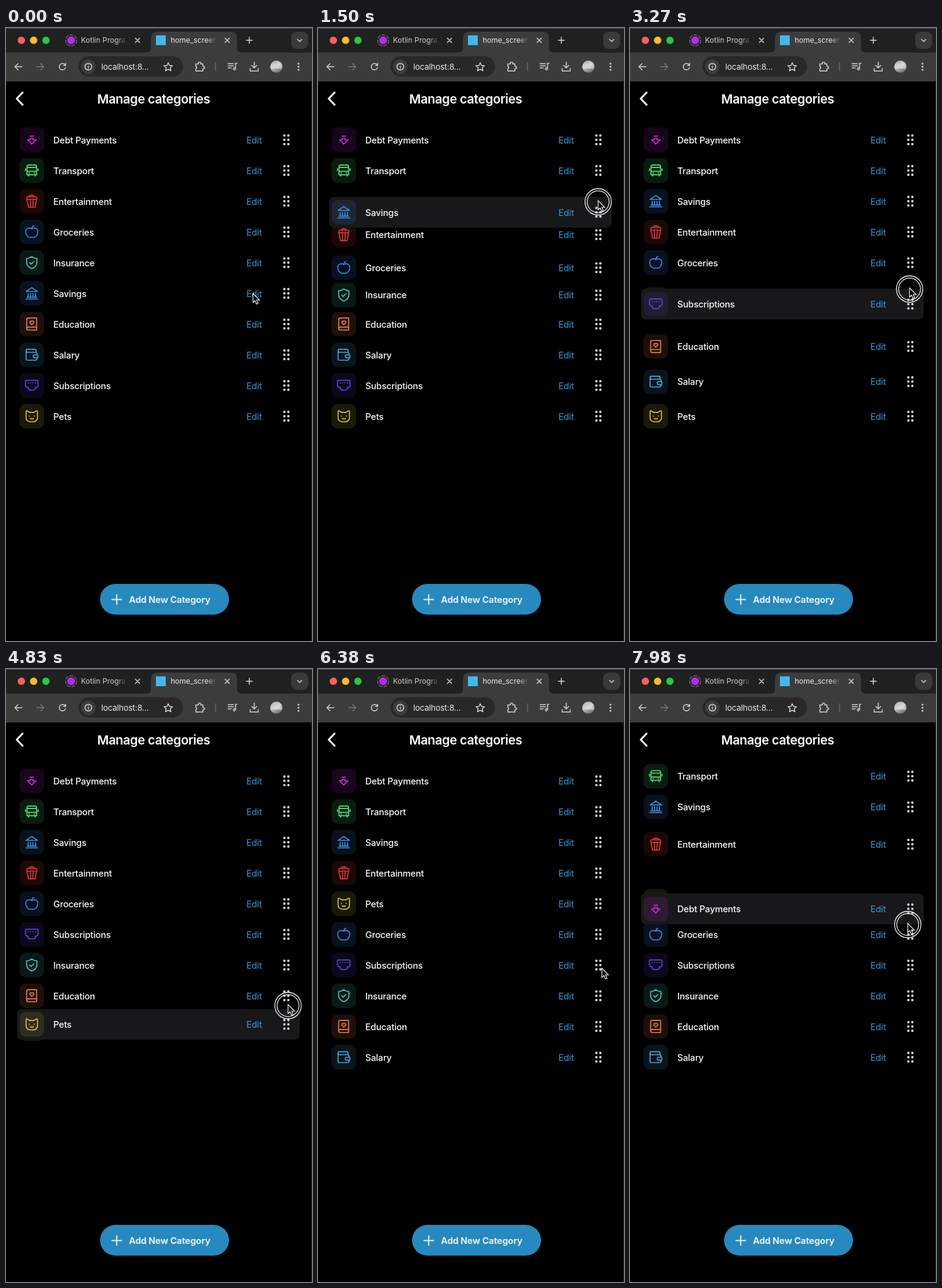
An HTML page that plays this animation: 498x998 px, repeating every 8 s.

```html
<!DOCTYPE html>
<html lang="en">
<head>
<meta charset="utf-8">
<title>Manage categories</title>
<style>
  html, body { margin: 0; width: 100%; height: 100%; overflow: hidden; background: #000; }
  svg { display: block; width: 498px; height: 998px; font-family: Inter, "Open Sans", sans-serif; }
  .line { fill: none; stroke-linecap: round; stroke-linejoin: round; }
  .label, .edit { font-size: 14.6px; letter-spacing: -.2px; }
  .label { font-weight: 500; fill: #fafafa; }
  .edit { fill: #369ad6; }
</style>
</head>
<body>
<svg viewBox="0 0 498 998">
  <defs>
    <linearGradient id="fadeBar"><stop stop-color="#1f2020" stop-opacity="0"/><stop offset=".7" stop-color="#1f2020"/></linearGradient>
    <linearGradient id="fadeTab"><stop stop-color="#3c3c3c" stop-opacity="0"/><stop offset=".7" stop-color="#3c3c3c"/></linearGradient>
    <linearGradient id="avatar" x2=".4" y2="1"><stop stop-color="#a5a5a5"/><stop offset=".5" stop-color="#d4d4d4"/><stop offset="1" stop-color="#777"/></linearGradient>
  </defs>
  <rect width="498" height="998"/>

  <!-- Browser window -->
  <rect width="498" height="41" fill="#1f2020"/>
  <rect width="498" height="1" fill="#4a4a4a"/>
  <circle cx="25" cy="20" r="6" fill="#ff5f57"/>
  <circle cx="45" cy="20" r="6" fill="#febc2e"/>
  <circle cx="65" cy="20" r="6" fill="#28c840"/>
  <path d="M228 40q8 0 8-8V16q0-10 10-10h120q10 0 10 10v16q0 8 8 8h114v47H0V40z" fill="#3c3c3c"/>
  <circle cx="106" cy="20" r="9" class="line" stroke="#66666a" stroke-width="1.5" stroke-dasharray="5 3"/>
  <circle cx="106" cy="20" r="6.5" fill="#b12de6"/>
  <rect x="244" y="12" width="16" height="16" fill="#42b8ee"/>
  <g font-size="12">
    <text x="122" y="24.3" fill="#d2d2d2">Kotlin Progra</text>
    <text x="268" y="24.3" fill="#eee">home_screen</text>
  </g>
  <rect x="180" y="8" width="24" height="26" fill="url(#fadeBar)"/>
  <rect x="326" y="8" width="24" height="26" fill="url(#fadeTab)"/>
  <rect x="464" y="6" width="28" height="28" rx="9" fill="#3a3a3b"/>
  <rect x="118" y="46" width="170" height="33" rx="16.5" fill="#282828"/>
  <circle cx="134" cy="63" r="12" fill="#3c3c3c"/>
  <text x="155" y="67.6" font-size="13.3" letter-spacing="-.2" fill="#e6e6e6">localhost:8...</text>
  <g class="line" stroke="#d2d2d2" stroke-width="1.5">
    <path d="M210.500 16.500l7 7m0-7l-7 7M356.500 16.500l7 7m0-7l-7 7M391 20h10m-5-5v10M474.500 18.500l3.500 3.500 3.500-3.500"/>
    <path d="M26 63H14.500m5-5l-5 5 5 5"/>
    <path d="M50 63h11.500m-5-5l5 5-5 5" stroke="#777"/>
    <path d="M96.500 60.500a5.200 5.200 0 1 0 .4 4M97 57.500v3.500h-3.500"/>
    <circle cx="134" cy="63" r="5.5"/><path d="M134 62.500v3M134 60v.1"/>
    <path d="M264 56.500l2 4.500 5 .5-3.800 3.300 1.200 4.900-4.400-2.600-4.400 2.600 1.200-4.900-3.800-3.300 5-.5z"/>
    <path d="M309 58.500h4v-1a2 2 0 0 1 4 0v1h3.500v4h.5a2 2 0 0 1 0 4h-.5v3.500H309v-3.700a2 2 0 0 0 0-3.800z"/>
    <path d="M341 56.500v13" stroke="#666"/>
    <path d="M361.500 58h8.500m-8.500 3.500h8.500m-8.500 3.500h5m7 1.500V57.500h2.500"/><circle cx="371.700" cy="66.500" r="1.7"/>
    <path d="M404 55.500v9.500m-4-4l4 4 4-4M397.500 66v4h13v-4"/>
  </g>
  <circle cx="440" cy="63" r="10" fill="url(#avatar)"/>
  <path d="M431 66l15-8 3 8z" fill="#e2e2e2" opacity=".6"/>
  <g fill="#d2d2d2"><circle cx="476" cy="58" r="1.500"/><circle cx="476" cy="63" r="1.500"/><circle cx="476" cy="68" r="1.500"/></g>

  <!-- App -->
  <path d="M27 105l-9.500 10 9.500 10" class="line" stroke="#fff" stroke-width="3"/>
  <text x="240.300" y="122.700" text-anchor="middle" font-size="20.5" font-weight="600" letter-spacing="-.4" fill="#fff">Manage categories</text>
  <g id="list"></g>
  <rect x="153" y="905" width="210" height="50" rx="25" fill="#2789bd"/>
  <path d="M172.500 930.500h15.500m-7.750-7.750v15.500" class="line" stroke="#e4eff5" stroke-width="2"/>
  <text x="200" y="935.700" font-size="14.700" font-weight="650" letter-spacing="-.15" fill="#e4eff5">Add New Category</text>
  <rect x="497" y="87" width="1" height="911" fill="#2a2a2a"/>

  <g id="pointer">
    <g id="ring" class="line" stroke="#f2f2f2">
      <circle cy="1" r="21.500" stroke-width="1.300"/>
      <circle cy="1" r="17.800" stroke-width="1.200"/>
    </g>
    <path d="M0-1v15l3.300-3 2.400 5.500 2.600-1.100-2.400-5.400h4.700z" stroke="#fff" stroke-width="1.100"/>
  </g>
</svg>
<script>
const LOOP = 8000, ROW = 50, TOP = 182;

// Name, colour, icon in a 24 px box
const categories = [
  ['Debt Payments', '#c92fdc', 'M9 6h6M9.500 9.500h5V12H19l-7 7-7-7h4.500z'],
  ['Transport', '#52e57e', 'M4 19V6q0-3 3-3h10q3 0 3 3v13zM4 7h16M4 13.500h16M1.500 9v3M22.500 9v3M6.500 19v2.500M17.500 19v2.500M7 16.300h1M16 16.300h1'],
  ['Entertainment', '#e23a3a', 'M4 9l2.500 13h11L20 9zM9.500 9l.8 13M14.500 9l-.8 13M4 9q-1.500-4.500 3-4.500Q8 2 12 2t5 2.500q4.500 0 3 4.500M9 5.500q3-2 6 0'],
  ['Groceries', '#3d86ec', 'M12 7C9 4.500 2 5 2 12c0 5 4 9.500 7 9.500 1.500 0 2-.5 3-.5s1.500.5 3 .5c3 0 7-4.500 7-9.500 0-7-7-7.500-10-5zM12 7q0-4 3.500-5'],
  ['Insurance', '#48cdb4', 'M12 2q4 3 8.500 3v7q0 6.500-8.500 10-8.500-3.500-8.500-10V5Q8 5 12 2zM8.500 12l2.500 2.500 4.500-4.500'],
  ['Savings', '#428de4', 'M2.500 9L12 2.500 21.500 9zM2 21.500h20M4 18.500h16M6 12v6M10 12v6M14 12v6M18 12v6'],
  ['Education', '#ea7c4c', 'M20 17H6q-2.500 0-2.500 2.500T6 22h14V2H6Q3.500 2 3.500 4.500v15M12 13L8.800 9.800C7.500 8 10.500 5.500 12 8c1.500-2.500 4.500 0 3.200 1.800z'],
  ['Salary', '#48a4dc', 'M19 8V4.500Q19 3 17.500 3H4.500Q2.500 3 2.500 5v14q0 2 2 2h14q2 0 2-2v-2M2.500 5.500Q3 8 5 8h13.500q2 0 2 2v2M22 12h-5a2.500 2.500 0 0 0 0 5h5z'],
  ['Subscriptions', '#5c43dc', 'M3 3.500h18q1.500 0 1.500 1.500v7q0 3-3 3H18v1.500q0 3-3 3H9q-3 0-3-3V15H4.500q-3 0-3-3V5q0-1.500 1.500-1.500zM6 7.500v.8M10 7.500v.8M14 7.500v.8M18 7.500v.8'],
  ['Pets', '#d4c44c', 'M2.500 5q0-3 2.500-1.500L9 6q3-.8 6 0l4-2.500q2.500-1.500 2.500 1.500v9q0 7.500-9.500 7.500T2.500 14zM8 11.500v.5M16 11.500v.5M9.500 16q1.500 1.500 2.500 0 1 1.500 2.500 0']
];

// path: [time, y] of the held row; swaps: when each neighbour makes room
const drags = [
  { from: 5, to: 2, press: 700, release: 1640, path: [[1060, 432], [1500, 300], [1700, 282]], swaps: [1240, 1319, 1362] },
  { from: 8, to: 5, press: 2700, release: 3400, path: [[2860, 582], [3270, 449.5], [3450, 432]], swaps: [3168, 3184, 3235] },
  { from: 9, to: 4, press: 4600, release: 5640, path: [[4620, 632], [4830, 578.5], [5080, 562], [5540, 390.5], [5740, 382]], swaps: [4810, 5180, 5250, 5385, 5413] },
  { from: 0, to: 4, press: 7450, release: 9000, path: [[7560, 182], [7980, 390.5]], swaps: [7780, 7817, 7870, 7960] }
];

// [time, x, y]
const pointerPath = [
  [250, 402, 433], [600, 456, 432], [1060, 456, 432], [1500, 456, 282], [1880, 455, 279],
  [2480, 455, 563], [2630, 455, 563], [2760, 457, 586], [2830, 457, 586], [3270, 455, 424],
  [3480, 454, 420], [4150, 459, 634], [4590, 459, 634], [4830, 459, 547], [5080, 460, 535],
  [5540, 464, 369], [5800, 464, 366], [6300, 462, 488], [6600, 462, 488], [7000, 462, 415],
  [7350, 452, 183], [7540, 452, 183], [7980, 452, 415]
];

const clamp = v => Math.max(0, Math.min(1, v));
const smooth = v => v * v * (3 - 2 * v);

function along(keys, t) {
  const next = keys.findIndex(key => key[0] > t);
  if (next === 0) return keys[0].slice(1);
  if (next < 0) return keys[keys.length - 1].slice(1);
  const a = keys[next - 1], b = keys[next];
  const p = smooth((t - a[0]) / (b[0] - a[0]));
  return a.slice(1).map((v, i) => v + (b[i + 1] - v) * p);
}

// Step response with damping ratio 0.5
function spring(ms) {
  if (ms <= 0) return 0;
  const s = ms / 1000, w = 17.32 * s;
  return 1 - Math.exp(-10 * s) * (Math.cos(w) + 0.577 * Math.sin(w));
}

const list = document.getElementById('list');
const pointer = document.getElementById('pointer');
const ring = document.getElementById('ring');

const handle = [-7, 0, 7].map(y =>
  `<circle cx="453" cy="${y}" r="2"/><circle cx="459.500" cy="${y}" r="2"/>`).join('');

const rows = categories.map(([name, color, icon], slot) => {
  const node = document.createElementNS('http://www.w3.org/2000/svg', 'g');
  node.innerHTML = `
    <rect x="18" y="-25" width="460" height="50" rx="8" fill="#18181a"/>
    <rect x="22" y="-20" width="40" height="40" rx="10" fill="${color}" opacity=".12"/>
    <path d="${icon}" transform="translate(30.200 -11.800) scale(.98)" class="line" stroke="${color}" stroke-width="1.700"/>
    <text x="77" y="5.500" class="label">${name}</text>
    <text x="391.300" y="5.500" class="edit">Edit</text>
    <g fill="#d6d6da">${handle}</g>`;
  list.append(node);
  return { node, plate: node.firstElementChild, slot, shifts: [] };
});

// Resolve which row is held and which rows give way in every drag
const order = [...rows];
for (const drag of drags) {
  const step = Math.sign(drag.to - drag.from);
  drag.row = order[drag.from];
  drag.swaps.forEach((time, i) =>
    order[drag.from + step * (i + 1)].shifts.push([time, -step * ROW]));
  order.splice(drag.to, 0, order.splice(drag.from, 1)[0]);
}

const lift = (drag, t) => clamp((t - drag.press) / 100) * clamp((drag.release + 100 - t) / 100);

function rowY(row, t) {
  let y = TOP + row.slot * ROW;
  const events = row.shifts.map(([time, by]) => ({ time, apply: () => y += by * spring(t - time) }));
  for (const drag of drags) if (drag.row === row)
    events.push({ time: drag.path[0][0], apply: () => y = along(drag.path, t)[0] });
  events.filter(e => e.time <= t).sort((a, b) => a.time - b.time).forEach(e => e.apply());
  return y;
}

let front = null;
function draw(t) {
  for (const row of rows) {
    row.node.setAttribute('transform', `translate(0 ${rowY(row, t).toFixed(2)})`);
    row.plate.setAttribute('opacity', 0);
  }
  let pressed = 0;
  for (const drag of drags) {
    const amount = lift(drag, t);
    if (!amount) continue;
    drag.row.plate.setAttribute('opacity', amount);
    if (front !== drag.row) list.append((front = drag.row).node);
    pressed = clamp((t - drag.press) / 80) * clamp((drag.release + 60 - t) / 60);
  }
  const [x, y] = along(pointerPath, t);
  pointer.setAttribute('transform', `translate(${x.toFixed(2)} ${y.toFixed(2)})`);
  ring.setAttribute('opacity', pressed);
}

function frame() {
  draw(performance.now() % LOOP);
  requestAnimationFrame(frame);
}
frame();
</script>
</body>
</html>
```
